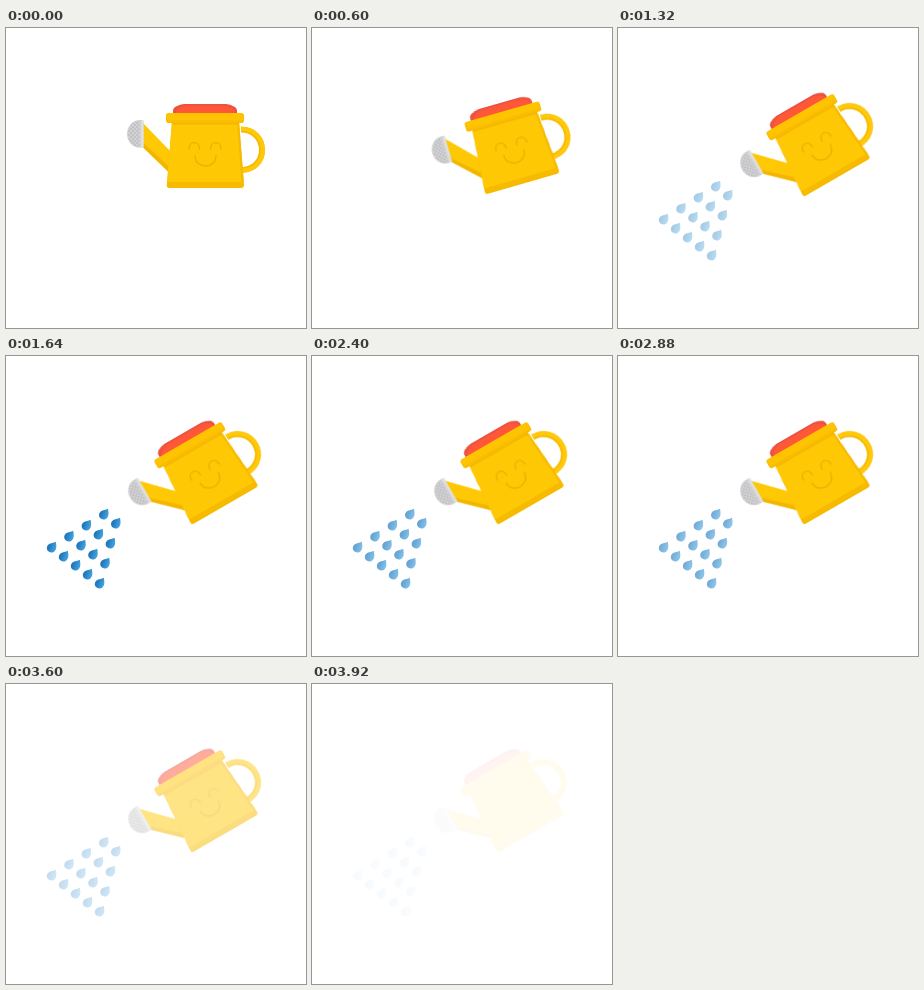
Animation of 300 by 300 pixels, one loop 4000 ms. Source, as an HTML page:

```html
<!DOCTYPE html>
<html lang="en">
<head>
<meta charset="utf-8">
<title>Watering can</title>
<style>
  html, body { margin: 0; width: 100%; height: 100%; overflow: hidden; background: #fff; }
  svg { display: block; width: 100%; height: 100%; }
  #scene { animation: leave 4s infinite; }
  #can { transform-origin: 190px 118px; animation: tilt 4s infinite; }
  #drops { animation: rain 4s infinite; }

  /* stepped at 25 pictures per second */
  @keyframes tilt {
    0% { transform: rotate(0deg); }
    7% { transform: rotate(0deg); animation-timing-function: steps(15, end); }
    22%, 100% { transform: rotate(-30deg); }
  }
  @keyframes rain {
    0% { opacity: 0; }
    28% { opacity: 0; animation-timing-function: steps(13, end); }
    41% { opacity: 1; animation-timing-function: steps(19, end); }
    60% { opacity: .68; animation-timing-function: steps(23, end); }
    83% { opacity: .55; animation-timing-function: steps(15, end); }
    98%, 100% { opacity: .5; }
  }
  @keyframes leave {
    0% { opacity: 1; }
    80% { opacity: 1; animation-timing-function: steps(3, end); }
    83% { opacity: .87; animation-timing-function: steps(15, end); }
    98%, 100% { opacity: .07; }
  }
</style>
</head>
<body>
<svg viewBox="0 0 300 300">
  <defs>
    <linearGradient id="water" x1="0" y1="0.3" x2="1" y2="0.7">
      <stop offset="0.25" stop-color="#2079bd"/>
      <stop offset="0.85" stop-color="#419fdb"/>
    </linearGradient>
    <pattern id="holes" width="4" height="4" patternUnits="userSpaceOnUse">
      <circle cx="1" cy="1" r="0.75" fill="#a9a9ab"/>
      <circle cx="3" cy="3" r="0.75" fill="#a9a9ab"/>
    </pattern>
    <path id="drop" fill="url(#water)" d="M4 -5.3 C4.6 -2 5.2 1.6 3 4 C1 6 -2 6 -3.8 4.1 C-5.7 2 -5.2 -1.2 -3 -2.7 C-1 -4 1.8 -4 4 -5.3Z"/>
  </defs>
  <g id="scene">
    <g id="can">
      <g fill="none">
        <path d="M235 101.5 C248 101.5 256 111 256 122 C256 133 248 142 235 142" stroke="#f6b900" stroke-width="6"/>
        <path d="M235 100.7 C248.5 100.7 256.8 110.5 256.8 122 C256.8 133.500 248.500 142.700 235 142.700" stroke="#ffc90a" stroke-width="4"/>
      </g>
      <path d="M136 94 L166 125 L162.500 144 L135 117Z" fill="#ffc805"/>
      <path d="M135 113 L163.500 139 L162.500 144 L135 117.500Z" fill="#f3b600"/>
      <path id="head" d="M137.500 92.500 V119.300 C128 121.500 121 114.500 121 106 C121 97.500 128 90.300 137.500 92.500Z" fill="#d2d2d4"/>
      <path d="M133.500 93 V119 C126.500 119.500 122 113 122 106 C122 99 126.500 92.500 133.500 93Z" fill="url(#holes)"/>
      <path d="M135.500 92.300 H137.500 V119.500 H135.500Z" fill="#e2e2e4"/>
      <path d="M167 87 V83 Q167 80 170 78.500 Q174 76 178 76 H220 Q224 76 228 78.500 Q231 80 231 83 V87Z" fill="#ed5140"/>
      <path d="M170 87 V83 Q176 78 181 78 H218 Q224 78 229 83 V87Z" fill="#ff5838"/>
      <path d="M166 93 H233 L238 157 Q238 160 235 160 H163.500 Q160.500 160 160.800 157Z" fill="#f6ba00"/>
      <path d="M166 93 H232 L236 154 H161.300Z" fill="#ffc805"/>
      <path d="M231 94 H233 L237.700 154 H235.500Z" fill="#f6ba00"/>
      <rect x="160" y="85" width="78" height="10" rx="2.800" fill="#f9bc00"/>
      <rect x="161" y="85" width="76" height="7.500" rx="2.500" fill="#ffc400"/>
      <path d="M166 95 H233 L233.100 96.500 H165.800Z" fill="#f3b600"/>
      <g fill="none" stroke="#ebb000" stroke-width="1.400" stroke-linecap="round">
        <path d="M183 121 C183 112.500 193.500 112.500 193.500 121"/>
        <path d="M204.500 121 C204.500 112.500 215 112.500 215 121"/>
        <path d="M189 128 C189.500 141.500 209.500 141.500 210 128"/>
      </g>
    </g>
    <g id="drops"></g>
  </g>
</svg>
<script>
  const drops = document.getElementById("drops");

  function addDrop(x, y) {
    const drop = document.createElementNS("http://www.w3.org/2000/svg", "use");
    drop.setAttribute("href", "#drop");
    drop.setAttribute("transform", `translate(${x} ${y})`);
    drops.append(drop);
  }

  // four widening rows of 2 to 5 drops
  for (let row = 0; row < 4; row++) {
    for (let i = 0; i < row + 2; i++) {
      addDrop(98 - 17.4 * row + 12 * i, 158 + 11 * row + 9 * i);
    }
  }
</script>
</body>
</html>
```
